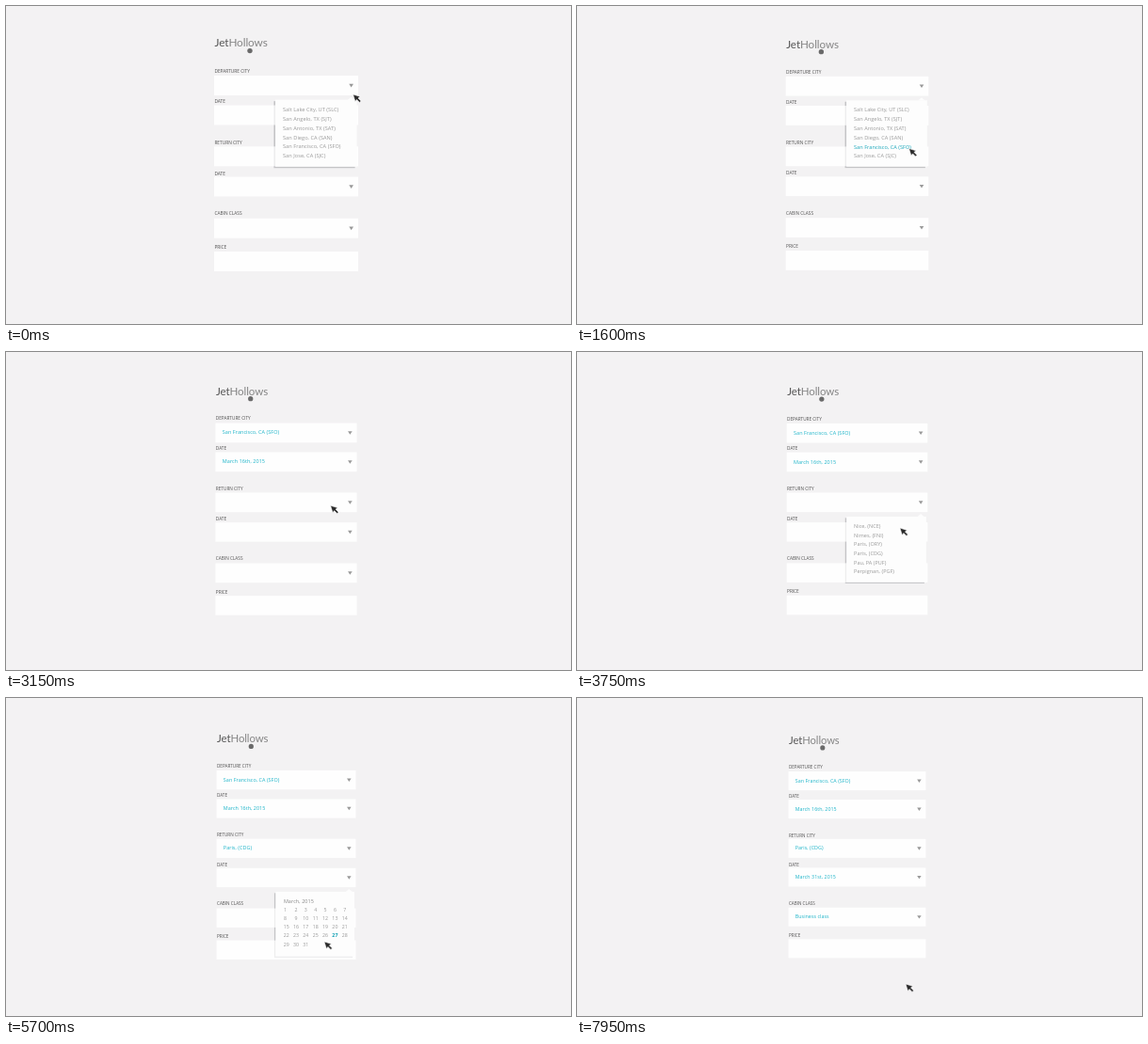
Write an HTML page with a canvas that moves like this. It is 600x338 px and loops after 8 s.

```html
<!DOCTYPE html>
<html lang="en">
<head>
<meta charset="utf-8">
<title>Flight booking form</title>
<style>
html, body { margin: 0; width: 100%; height: 100%; overflow: hidden; background: #f3f2f3; }
canvas { display: block; width: 600px; height: 338px; }
</style>
</head>
<body>
<canvas id="stage"></canvas>
<script>
const W = 600, H = 338, LOOP = 8000;
const CX = 297.5, CY = 161;
const SANS = '"Open Sans", "Noto Sans", sans-serif';
const TEAL = '#1cb4c9';

const canvas = document.getElementById('stage');
const ctx = canvas.getContext('2d');
const dpr = window.devicePixelRatio || 1;
canvas.width = W * dpr;
canvas.height = H * dpr;

const clamp = (v, a = 0, b = 1) => Math.min(b, Math.max(a, v));
const zoom = t => 1 - 0.047 * t / 7950;

// y: top of the white box, at: time its value is filled in
const fields = [
  { label: 'DEPARTURE CITY', y: 74, labelY: 69, value: 'San Francisco, CA (SFO)', at: 1740 },
  { label: 'DATE', y: 105.5, labelY: 101.3, value: 'March 16th, 2015', at: 3010 },
  { label: 'RETURN CITY', y: 149.3, labelY: 145.3, value: 'Paris, (CDG)', at: 4320 },
  { label: 'DATE', y: 181.5, labelY: 177.8, value: 'March 31st, 2015', at: 6230 },
  { label: 'CABIN CLASS', y: 225.8, labelY: 220.7, value: 'Business class', at: 7390 },
  { label: 'PRICE', y: 261, labelY: 256.7 }
];
const BOX = { x: 221, w: 153, h: 21 };

const panels = [
  { top: 99.7, h: 71, open: -600, close: 1740, items: [
    'Salt Lake City, UT (SLC)', 'San Angelo, TX (SJT)', 'San Antonio, TX (SAT)',
    'San Diego, CA (SAN)', 'San Francisco, CA (SFO)', 'San Jose, CA (SJC)'] },
  { top: 131.5, h: 71, open: 2262, close: 3010 },
  { top: 175.3, h: 71, open: 3255, close: 4320, items: [
    'Nice, (NCE)', 'Nimes, (FNI)', 'Paris, (ORY)',
    'Paris, (CDG)', 'Pau, PA (PUF)', 'Perpignan, (PGF)'] },
  { top: 207.5, h: 71, open: 4812, close: 6230 },
  { top: 251.8, h: 42, open: 6905, close: 7390, items: [
    'Economy class', 'Business class', 'First class'] }
];
const PX = 286, PW = 86.5, ROW = 9.9;

// cursor tip: time, x, y
const path = [
  [0, 368.5, 94], [850, 358.5, 130], [1450, 352.5, 151.5], [1700, 352.5, 151.5],
  [2150, 367, 116], [2280, 367, 116], [2550, 357, 134.5], [2900, 309, 170],
  [3020, 309, 170], [3240, 364.5, 159.5], [3480, 364.5, 159.5], [3750, 343, 187],
  [4100, 316, 214], [4320, 316, 214], [4750, 368.5, 191], [5160, 368.5, 191],
  [5600, 348, 250], [5700, 338, 259], [5980, 319, 261], [6260, 319, 261],
  [6800, 358, 237], [6900, 364.5, 234], [7050, 364.5, 234], [7270, 337, 265],
  [7400, 337, 265], [7650, 346, 289], [7950, 349, 304], [8000, 349, 304]
];

function slope(i, k) {
  const a = path[i - 1], b = path[i], c = path[i + 1];
  if (!a || !c || a[k] === b[k] || b[k] === c[k]) return 0;
  return (c[k] - a[k]) / (c[0] - a[0]);
}

function cursorAt(t) {
  t = clamp(t, 0, LOOP - 0.01);
  const i = path.findIndex(p => p[0] > t) - 1;
  const a = path[i], b = path[i + 1], d = b[0] - a[0], u = (t - a[0]) / d;
  const u2 = u * u, u3 = u2 * u;
  const axis = k => (2 * u3 - 3 * u2 + 1) * a[k] + (u3 - 2 * u2 + u) * d * slope(i, k)
    + (3 * u2 - 2 * u3) * b[k] + (u3 - u2) * d * slope(i + 1, k);
  return { x: axis(1), y: axis(2) };
}

function text(str, x, y, size, color, { align = 'left', weight = 400, gap = 0.05, family = SANS } = {}) {
  ctx.font = `${weight} ${size}px ${family}`;
  ctx.letterSpacing = gap + 'px';
  ctx.textAlign = align;
  ctx.textBaseline = 'alphabetic';
  ctx.fillStyle = color;
  ctx.fillText(str, x, y + size * 0.355);
  return ctx.measureText(str).width;
}

function polygon(color, ...pts) {
  ctx.fillStyle = color;
  ctx.beginPath();
  pts.forEach(([x, y]) => ctx.lineTo(x, y));
  ctx.closePath();
  ctx.fill();
}

function rect(color, x, y, w, h) {
  ctx.fillStyle = color;
  ctx.fillRect(x, y, w, h);
}

function drawBrand() {
  const opt = { family: 'Lato, sans-serif', gap: -0.1 };
  const w = text('Jet', 221.5, 39.2, 11.8, '#555', opt);
  text('Hollows', 221.5 + w, 39.2, 11.8, '#858585', opt);
  ctx.fillStyle = '#6a6a6a';
  ctx.beginPath();
  ctx.arc(259, 47.6, 2.7, 0, Math.PI * 2);
  ctx.fill();
}

function drawField(f, t) {
  text(f.label, 221.4, f.labelY, 4.8, '#505050', { gap: 0 });
  rect('#fefefe', BOX.x, f.y, BOX.w, BOX.h);
  if (!f.value) return;
  const mid = f.y + BOX.h / 2;
  polygon('#999', [364.3, mid - 1.7], [369, mid - 1.7], [366.65, mid + 1.9]);
  if (t >= f.at) text(f.value, 228.5, mid - 0.4, 5.6, TEAL);
}

function drawShadow(p, height, alpha) {
  ctx.globalAlpha = alpha;
  rect('#c4c4c6', PX - 1.5, p.top + 1.5, 1.5, height - 1.5);
  rect('#c4c4c6', PX - 1.5, p.top + height, PW - 0.5, 1.5);
  ctx.globalAlpha = 1;
}

function drawList(p, tip) {
  p.items.forEach((item, i) => {
    const y = p.top + 10.2 + i * ROW;
    ctx.font = `400 5.6px ${SANS}`;
    const end = 294 + ctx.measureText(item).width + 1;
    const hot = Math.abs(tip.y - y) < ROW / 2 && tip.x > 293 && tip.x < end;
    text(item, 294, y, 5.6, hot ? '#14a5b9' : '#989898');
  });
}

function drawCalendar(p, tip) {
  text('March, 2015', 294.8, p.top + 10.4, 5.6, '#868686', { gap: 0.1 });
  for (let d = 0; d < 31; d++) {
    const col = d % 7;
    const x = (col ? 297.7 : d < 8 ? 296.6 : 297.7) + col * 10.7;
    const y = p.top + 20.1 + Math.floor(d / 7) * 9.4;
    const hot = Math.abs(tip.x - x) < 5.3 && Math.abs(tip.y - y) < 4.7;
    text(String(d + 1), x, y, 5.4, hot ? '#12a0b4' : '#989898',
      { align: 'center', weight: hot ? 700 : 400 });
  }
}

function drawPanel(p, height, alpha, tip) {
  ctx.globalAlpha = alpha;
  rect('#fdfdfd', PX, p.top, PW, height);
  polygon('#fdfdfd', [362.8, p.top + 0.2], [370.4, p.top + 0.2], [366.6, p.top - 3]);
  ctx.globalAlpha = alpha * clamp((height / p.h - 0.52) / 0.28);
  if (p.items) drawList(p, tip);
  else drawCalendar(p, tip);
  ctx.globalAlpha = 1;
}

function drawCursor({ x, y }) {
  ctx.save();
  ctx.translate(x, y);
  ctx.lineWidth = 0.6;
  ctx.strokeStyle = '#fff';
  polygon('#2a2a2a', [0, 0], [7.6, 2.3], [5.5, 3.9], [8.5, 6.9], [7, 8.4], [4, 5.4], [2.4, 7.5]);
  ctx.stroke();
  ctx.restore();
}

function draw(t) {
  const s = zoom(t);
  ctx.setTransform(dpr, 0, 0, dpr, 0, 0);
  rect('#f3f2f3', 0, 0, W, H);

  // hover reacts slightly after the pointer
  const late = cursorAt(t - 100);
  const tip = { x: (late.x - CX) / s + CX, y: (late.y - CY) / s + CY };
  const p = panels.find(q => t >= q.open && t < q.close + 100);
  const rest = p ? 1 - clamp((t - p.open) / 500) : 0;
  const height = p ? p.h * (1 - rest * rest) : 0;
  const alpha = p ? 1 - clamp((t - p.close) / 100) : 0;

  ctx.save();
  ctx.translate(CX, CY);
  ctx.scale(s, s);
  ctx.translate(-CX, -CY);
  drawBrand();
  if (p) drawShadow(p, height, alpha);
  fields.forEach(f => drawField(f, t));
  if (p) {
    drawShadow(p, height, alpha * 0.3);
    drawPanel(p, height, alpha, tip);
  }
  ctx.restore();
  drawCursor(cursorAt(t));
}

const start = performance.now();
function tick() {
  draw((performance.now() - start) % LOOP);
  requestAnimationFrame(tick);
}
tick();
</script>
</body>
</html>
```
